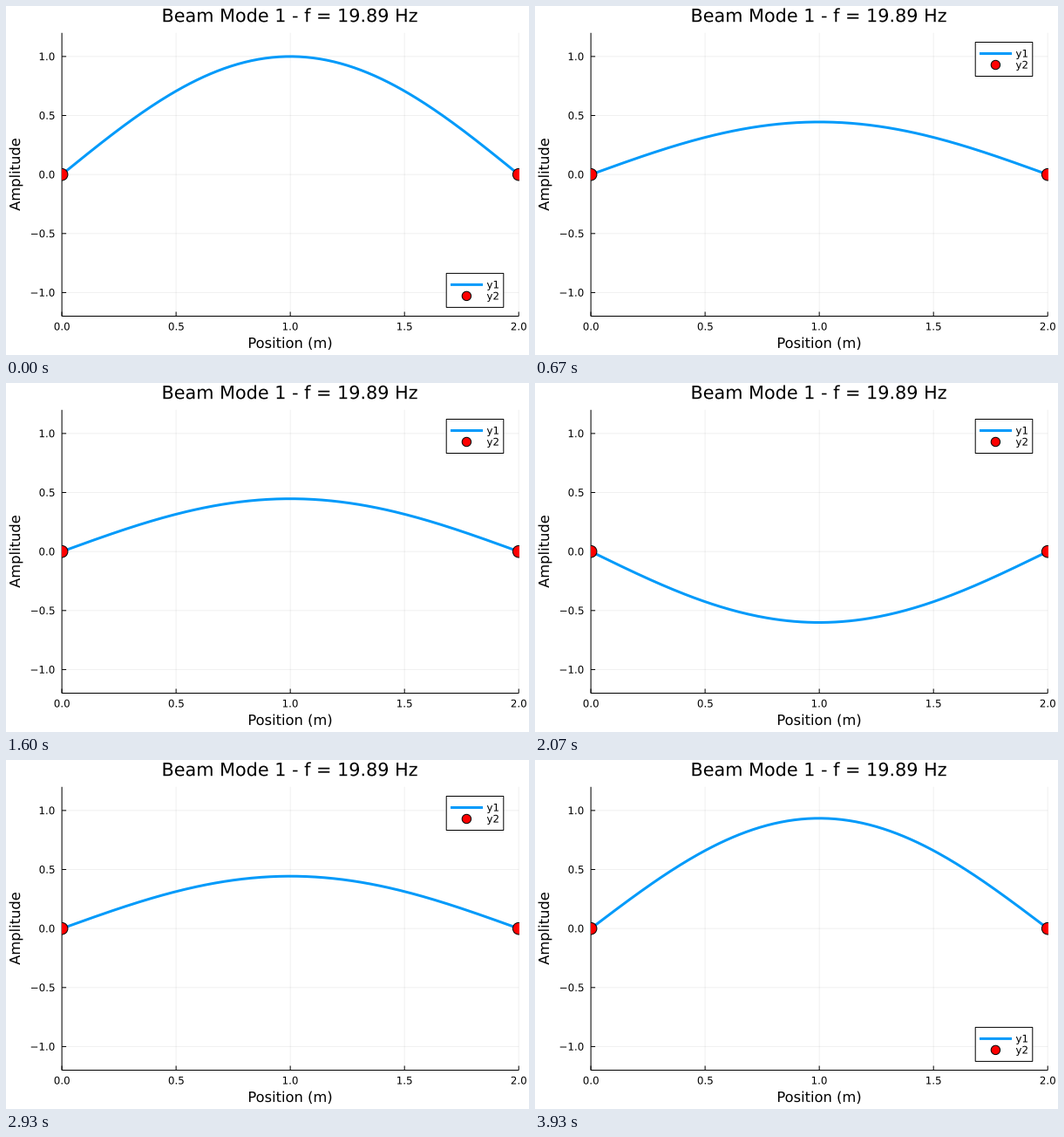
A matplotlib script for the animation above (3.99 s loop, 600 by 400 pixels).

```python
import numpy as np
import matplotlib.pyplot as plt
from matplotlib.animation import FuncAnimation
from matplotlib.patches import Circle, PathPatch, Rectangle
from matplotlib.textpath import TextPath
from matplotlib.transforms import Affine2D

plt.rcParams["font.family"] = "DejaVu Sans"
plt.rcParams["path.snap"] = False

FRAMES, LOOP_MS = 60, 3990
W, H, DPI = 600, 400, 100
PT = 72 / DPI                       # points per pixel
LEFT, RIGHT, TOP, BOTTOM = 64.1, 588.2, 30.8, 355.5
LENGTH, YMAX = 2.0, 1.2
FREQ = 19.8851
BLUE, RED = "#009AFA", "#FF0000"
TITLE, LABEL, TICK = (1.483 * pt for pt in (14, 11, 8))
LEGEND_DROP = 264.9

fig = plt.figure(figsize=(W / DPI, H / DPI), dpi=DPI, facecolor="white")
ax = fig.add_axes([0, 0, 1, 1])
ax.set(xlim=(0, W), ylim=(H, 0))
ax.axis("off")


def px(x):
    return LEFT + (RIGHT - LEFT) * x / LENGTH


def py(y):
    return (TOP + BOTTOM) / 2 - (BOTTOM - TOP) / 2 * y / YMAX


def stroke(xs, ys, width=1, color="black", **kw):
    return ax.plot(xs, ys, color=color, lw=width * PT,
                   solid_capstyle="butt", **kw)[0]


def text(s, x, y, size, align=0.5, angle=0, **kw):
    """Draw s with its baseline at y; align is the anchored share of its width."""
    path = TextPath((0, 0), s, size=size)
    box = path.get_extents()
    shift = box.x0 + align * box.width
    place = Affine2D().translate(-shift, 0).scale(1, -1).rotate_deg(angle).translate(x, y)
    ax.add_patch(PathPatch(place.transform_path(path), fc="black", lw=0, **kw))


def dot(x, y, r, **kw):
    return ax.add_patch(Circle((x, y), r, fc=RED, ec="black", lw=PT, **kw))


# Grid, ticks and axes
for x in np.arange(0, 2.1, 0.5):
    stroke([px(x)] * 2, [TOP, BOTTOM], alpha=0.06, zorder=0)
    stroke([px(x)] * 2, [BOTTOM, BOTTOM - 5], zorder=1)
    text(f"{x:.1f}", px(x) + 0.1, 371.5, TICK)
for y in np.arange(-1, 1.1, 0.5):
    stroke([LEFT, RIGHT], [py(y)] * 2, alpha=0.06, zorder=0)
    stroke([LEFT, LEFT + 5], [py(y)] * 2, zorder=1)
    text(f"{y:.1f}".replace("-", "\u2212"), 55.5, py(y) + 4.3, TICK, align=1)
stroke([LEFT, LEFT], [TOP, BOTTOM], zorder=1)
stroke([LEFT, RIGHT], [BOTTOM, BOTTOM], zorder=1)

text(f"Beam Mode 1 - f = {FREQ:.2f} Hz", 326.1, 18.2, TITLE)
text("Position (m)", 326.1, 391.9, LABEL)
text("Amplitude", 16, 193.4, LABEL, angle=-90)

# Beam with its two supports, clipped to the plot area
area = Rectangle((64, TOP), 525, BOTTOM - TOP, transform=ax.transData)
xs = np.linspace(0, LENGTH, 201)
mode = np.sin(np.pi * xs / LENGTH)
beam = stroke(px(xs), py(mode), 3, BLUE, zorder=3)
beam.set_clip_path(area)
for end in (0, LENGTH):
    dot(px(end), py(0), 6.8, zorder=4).set_clip_path(area)

# Legend, drawn in its top place; the shared transform moves it as one
drop = Affine2D()
group = dict(transform=drop + ax.transData, zorder=5)
ax.add_patch(Rectangle((505.2, 41.5), 65.6, 39, fc="white", ec="black",
                       lw=PT, **group))
stroke([510, 547], [54.5, 54.5], 3, BLUE, **group)
dot(528.4, 67.5, 5.2, **group)
for name, y in (("y1", 58.6), ("y2", 71.6)):
    text(name, 551.8, y, TICK, align=0, **group)
ax.patches[-1].set_zorder(6)
for part in (*ax.lines[-1:], *ax.patches[-3:]):
    part.set_zorder(6)


def update(i):
    t = 2 * np.pi * i / (FRAMES - 1)
    y = mode * np.cos(2 * np.pi * FREQ * t)
    beam.set_ydata(py(y))
    # The legend leaves the top right corner when the beam enters it
    crowded = np.any((xs >= 0.75 * LENGTH) & (y >= 0.5 * YMAX))
    drop.clear().translate(0, LEGEND_DROP if crowded else 0)
    return [beam]


anim = FuncAnimation(fig, update, frames=FRAMES, interval=LOOP_MS / FRAMES,
                     repeat=True, repeat_delay=0, blit=False)
plt.show()
```
